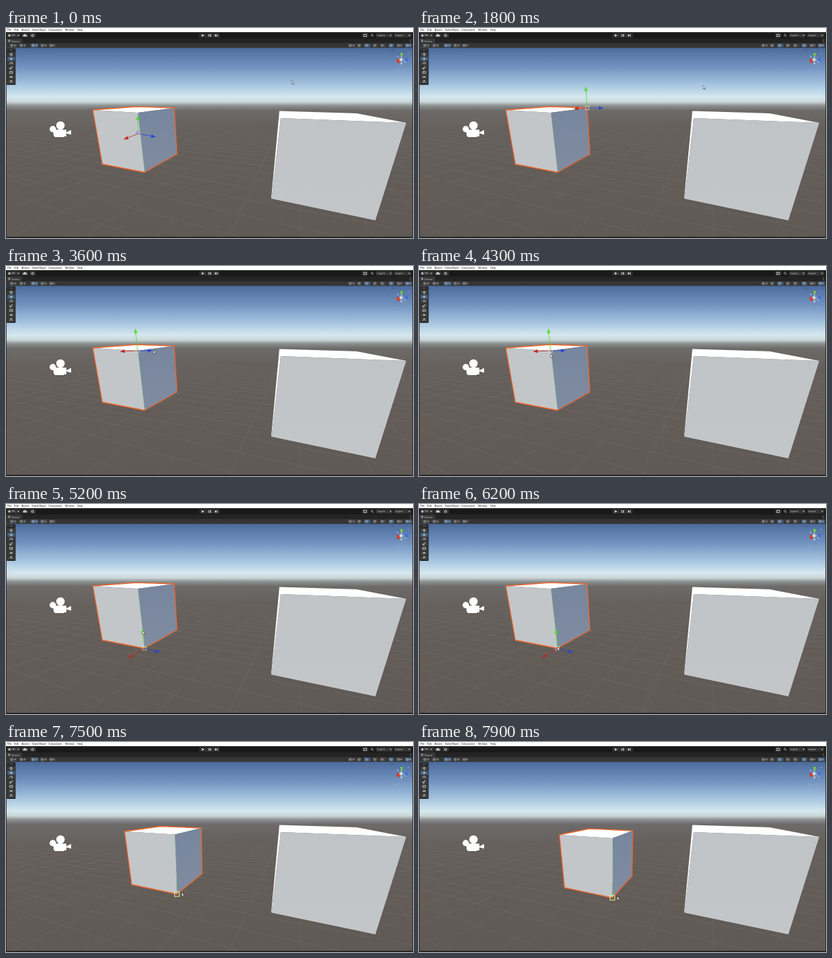
An HTML page for the animation above (8 s loop, 600 by 310 pixels).

```html
<!DOCTYPE html>
<html lang="en">
<head>
<meta charset="utf-8">
<title>Vertex snapping</title>
<style>
html, body { margin: 0; width: 100%; height: 100%; overflow: hidden; background: #191919; }
svg { display: block; width: 600px; height: 310px; }
text { font-family: "Liberation Sans", Arial, sans-serif; font-size: 3.8px; }
</style>
</head>
<body>
<svg id="stage" viewBox="0 0 600 310" xmlns="http://www.w3.org/2000/svg">
  <defs>
    <linearGradient id="sky" gradientUnits="userSpaceOnUse" x1="0" y1="29" x2="0" y2="310">
      <stop offset="0" stop-color="#4b6b9b"/>
      <stop offset=".1" stop-color="#7192bf"/>
      <stop offset=".19" stop-color="#a3c2df"/>
      <stop offset=".26" stop-color="#d5e8ef"/>
      <stop offset=".285" stop-color="#cbd6d8"/>
      <stop offset=".305" stop-color="#8b9090"/>
      <stop offset=".33" stop-color="#6d6b69"/>
      <stop offset=".42" stop-color="#655f5b"/>
      <stop offset="1" stop-color="#605954"/>
    </linearGradient>
    <linearGradient id="fade" gradientUnits="userSpaceOnUse" x1="0" y1="125" x2="0" y2="310">
      <stop offset="0" stop-color="#8b8988" stop-opacity="0"/>
      <stop offset=".3" stop-color="#8b8988" stop-opacity=".28"/>
      <stop offset="1" stop-color="#8b8988" stop-opacity=".32"/>
    </linearGradient>
    <linearGradient id="side" x1="0" y1="0" x2="0" y2="1">
      <stop offset="0" stop-color="#78869d"/>
      <stop offset="1" stop-color="#7f8ca1"/>
    </linearGradient>
    <linearGradient id="front" x1="0" y1="0" x2="0" y2="1">
      <stop offset="0" stop-color="#c0c4c7"/>
      <stop offset="1" stop-color="#c3c6c9"/>
    </linearGradient>
    <clipPath id="view"><rect y="29" width="600" height="279"/></clipPath>
  </defs>
  <rect y="29" width="600" height="281" fill="url(#sky)"/>
  <g id="grid" fill="none" stroke="url(#fade)" stroke-width=".6" clip-path="url(#view)"/>

  <g fill="#fff">
    <circle cx="69" cy="149.3" r="4.7"/>
    <circle cx="80.3" cy="144" r="6.2"/>
    <path d="M70 150h19v10h-4l1 1h-14l-2-3zM89 154l7-3.5v7l-7-2z"/>
  </g>

  <g id="bigCube">
    <path fill="#fff" d="M403 122.5L517 126L590 140L405 133L391.5 252L391 251Z"/>
    <path fill="url(#front)" d="M405 133L590 140L544.5 284L391.5 252Z"/>
  </g>

  <g id="cube">
    <path id="top" fill="#fff"/>
    <path id="left" fill="#c2c6c9"/>
    <path id="right" fill="url(#side)"/>
    <path id="edge" fill="none" stroke="#b4d5b7" stroke-width=".6"/>
    <path id="outline" fill="none" stroke="#f2652a" stroke-width="1.3" stroke-linejoin="round"/>
  </g>
  <g id="gizmo"></g>

  <g id="axes">
    <path d="M583 47V40M583 47L589 46.5M583 47L579 48" stroke="#d6dde6" stroke-width="1"/>
    <path d="M581 37h4.2l-2 6z" fill="#79d82b"/>
    <path d="M592 43.8v5.4l-6-2.4z" fill="#3c6ee0"/>
    <path d="M575.5 45.5l5 .7v5l-4 .5z" fill="#d2402b"/>
    <path d="M580.3 44.8h4v4h-4z" fill="#d9d9d9"/>
    <path d="M583 49l1.5 4.5h-3.2z" fill="#c9cdd2"/>
    <path d="M576 41l3 2M590 51l-3-1.5" stroke="#c9cdd2"/>
    <path d="M568 32.4h4M568 33.6h4" stroke="#3d5679" stroke-width=".6"/>
    <path d="M592 37.5h2M576 62.5h2M588 62.5h1" stroke="#b9c9da" stroke-width=".7"/>
  </g>

  <g id="chrome">
    <rect width="600" height="6.4" fill="#fff"/>
    <rect y="6.4" width="600" height="9" fill="#191919"/>
    <rect y="15.4" width="600" height="7" fill="#242424"/>
    <rect y="15.4" width="24" height="7" fill="#383838"/>
    <rect y="22.2" width="600" height="7.2" fill="#353535"/>
    <rect y="308.4" width="600" height="1.6" fill="#1c1c1c"/>
    <rect y="29" width=".8" height="281" fill="#222"/>
    <rect x="599.2" y="29" width=".8" height="281" fill="#222"/>
    <g id="menu" fill="#151515"></g>
    <g fill="#c8c8c8">
      <rect x="1.5" y="7.7" width="20" height="6.6" rx="1" fill="#343434"/>
      <circle cx="5" cy="11" r="1.7"/>
      <text x="8.5" y="12.4">RK</text>
      <path d="M16.5 10.3h3l-1.5 1.8z"/>
      <rect x="23" y="7.7" width="10" height="6.6" rx="1" fill="#343434"/>
      <path d="M25.5 12.6a1.3 1.3 0 0 1 .4-2.4a2 2 0 0 1 3.7 0a1.2 1.2 0 0 1 .5 2.4z"/>
      <rect x="34.5" y="7.7" width="9.5" height="6.6" rx="1" fill="#343434"/>
      <circle cx="39.2" cy="11" r="1.5" fill="none" stroke="#c8c8c8" stroke-width="1"/>
      <rect x="285" y="7.7" width="30" height="6.6" rx="1" fill="#303030"/>
      <path d="M288.7 9l3.6 2l-3.6 2zM298.7 9h1.1v4h-1.1zM301 9h1.1v4h-1.1zM308 9l2.6 2l-2.6 2zM310.8 9h.9v4h-.9z" fill="#ddd"/>
      <rect x="525" y="7.7" width="9" height="6.6" rx="1" fill="#343434"/>
      <rect x="527.5" y="9.3" width="3.8" height="3.3" fill="none" stroke="#c8c8c8" stroke-width=".8"/>
      <circle cx="539.5" cy="10.5" r="1.4" fill="none" stroke="#c8c8c8" stroke-width=".7"/>
      <path d="M540.5 11.5l1.6 1.6" stroke="#c8c8c8" stroke-width=".8"/>
      <rect x="545.5" y="7.7" width="24.5" height="6.6" rx="1" fill="#343434"/>
      <rect x="572" y="7.7" width="25.5" height="6.6" rx="1" fill="#343434"/>
      <text x="547.5" y="12.4">Layers</text>
      <text x="574" y="12.4">Layout</text>
      <path d="M565.5 10.3h3l-1.5 1.8zM593 10.3h3l-1.5 1.8z"/>
      <path d="M3 18h3.4M3 19.8h3.4M4 17v3.8M5.4 17v3.8" stroke="#c8c8c8" stroke-width=".5"/>
      <text x="8" y="20.5" style="font-size:4.2px">Scene</text>
      <path d="M596 17v.8M596 18.6v.8M596 20.2v.8" stroke="#c8c8c8" stroke-width=".8"/>
    </g>
    <g id="bar"></g>
    <g id="tools"></g>
  </g>
  <path id="cursor" d="M0 0V5.2L1.2 4.1L2.1 6L3 5.6L2.1 3.8H3.8Z" fill="#fff" stroke="#222" stroke-width=".5"/>
</svg>
<script>
const LOOP = 8000, STEP = 100;
const $ = id => document.getElementById(id);
const mix = (a, b, k) => a + (b - a) * k;
const mixPt = (p, q, k) => [mix(p[0], q[0], k), mix(p[1], q[1], k)];
const poly = pts => "M" + pts.map(p => p.join(" ")).join("L") + "Z";
const line = (p, q, color, w) =>
  `<path d="M${p}L${q}" stroke="${color}" stroke-width="${w}" fill="none"/>`;
const box = (x, y, w, h, fill, extra = "") =>
  `<rect x="${x}" y="${y}" width="${w}" height="${h}" fill="${fill}" ${extra}/>`;

// Ground lines fan out from the two vanishing points
function drawGrid() {
  let d = "";
  for (let i = -24; i <= 24; i++) d += `M420 108L${4 + i * 108} 310`;
  for (let i = 1; i <= 26; i++) d += `M-400 108L${-400 + i * 150} 310`;
  $("grid").innerHTML = `<path d="${d}"/>`;
}

function drawMenu() {
  const items = { File: 2, Edit: 12, Assets: 23, GameObject: 38, Component: 62.5, Window: 87, Help: 105 };
  $("menu").innerHTML = Object.entries(items)
    .map(([name, x]) => `<text x="${x}" y="4.4">${name}</text>`).join("");
}

function drawBar() {
  const cells = [[5, 11], [19, 11], [36.5, 11, 1], [50, 11], [63, 10], [504, 11], [517, 7],
    [528, 9, 1], [540, 8], [551, 9], [564, 8, 1], [575, 10], [588, 10, 1]];
  $("bar").innerHTML = cells.map(([x, w, on]) =>
    box(x, 23, w, 5.6, on ? "#46607c" : "#454545", 'rx=".8"') +
    `<circle cx="${x + 3.6}" cy="25.8" r="1.4" fill="none" stroke="#d0d0d0" stroke-width=".7"/>` +
    (w > 9 ? `<path d="M${x + w - 4} 25.2h2.6l-1.3 1.5z" fill="#c8c8c8"/>` : "")).join("");
}

function drawTools() {
  const icons = ["M-1.5 -1v1.5L-.5 2H1L1.6 -.8M-.5 0V-2M.6 0V-2", "M-2.2 0H2.2M0 -2.2V2.2",
    "M-1.5 1A1.8 1.8 0 1 1 1.5 1M1.5 1V-.6", "M-1.8 1.8V0H0V1.8ZM0 0L1.8 -1.8H.4",
    "M-2 -1.5H2V1.5H-2Z", "M-1.5 -1.5L1.5 1.5M1.5 -1.5L-1.5 1.5M-2 0H2", "M-2 2L0 -1.5L2 2M-1 -1.5H1"];
  $("tools").innerHTML = box(1, 30, 13.2, 54, "#2b2b2b", 'rx="1"') +
    line([5, 32.5], [10, 32.5], "#777", .7) +
    icons.map((d, i) => {
      const y = 38.8 + i * 6.7;
      return box(2, y - 3, 11.2, 6, i === 1 ? "#46607c" : "#3c3c3c") +
        `<path transform="translate(7.6 ${y})" d="${d}" fill="none" stroke="#ddd" stroke-width=".8"/>`;
    }).join("");
}

// Corner order: left, back, right, near top, right bottom, near bottom, left bottom
const REST = [[128, 121], [193, 116], [248, 118], [194, 125], [252, 186], [204, 213], [142, 201]];
const MID = [[142.5, 127], [205, 121], [261, 123], [212, 131], [264, 191], [219, 219], [156, 206]];
const END = [[207, 137], [251, 128], [315, 131], [285, 142], [314, 198], [285, 230], [214.5, 215]];
const DRAG = 6600, SNAP = 900;

function cubeAt(t) {
  if (t <= DRAG) return REST;
  const late = t > 7100;
  const [a, b] = late ? [MID, END] : [REST, MID];
  const k = late ? (t - 7100) / 800 : (t - DRAG) / 500;
  return a.map((p, i) => mixPt(p, b[i], Math.min(k, 1)));
}

const PATH = [[0, 421, 77.5], [1400, 421, 77.5], [1600, 419, 85], [1800, 419, 85], [2600, 248, 117],
  [3000, 248, 117], [4100, 194, 130], [4300, 194, 130], [5700, 204, 211], [6600, 204, 211]];

function cursorAt(t, cube) {
  if (t > DRAG) {
    const k = Math.min((t - DRAG) / 300, 1);
    return [cube[5][0] + 7 * k, cube[5][1] - 2];
  }
  const i = Math.max(1, PATH.findIndex(p => p[0] >= t));
  const a = PATH[i - 1], b = PATH[i];
  const k = (t - a[0]) / (b[0] - a[0]);
  return mixPt(a.slice(1), b.slice(1), k * k * (3 - 2 * k));
}

// Arrow offsets: red, blue, green
const CENTER = [[-18, 7], [22, 4], [-1, -23]];
const ARROWS = {
  2: [[-16, 1], [20, 0], [-2, -28]],
  3: [[-22, 1], [18, 0], [-3, -29]],
  5: [[-20, 12], [19, 5], [-2, -25]]
};
const RGB = ["#c3241d", "#2b44d8", "#55db28"];

function arrow(o, off, color) {
  const len = Math.hypot(...off), u = [off[0] / len, off[1] / len];
  const at = (f, s) => [o[0] + off[0] + u[0] * f - u[1] * s, o[1] + off[1] + u[1] * f + u[0] * s];
  return line(o, at(-3, 0), color, .8) +
    `<path d="${poly([at(-3, -2.5), at(4, 0), at(-3, 2.5)])}" fill="${color}"/>`;
}

function square(p, size, color, w) {
  return box(p[0] - size / 2, p[1] - size / 2, size, size, "none", `stroke="${color}" stroke-width="${w}"`);
}

function gizmo(t, cube, tip) {
  if (t > DRAG) {
    const p = cube[5];
    return line(p, [p[0], p[1] - 22], "#5f9a5c", .5) +
      line(p, [p[0] + 20, p[1] + 5], "#8a6048", .4) + square(p, 7, "#e8dc8c", 1.1);
  }
  const snap = t >= SNAP;
  const gap = i => Math.hypot(cube[i][0] - tip[0], cube[i][1] - tip[1]);
  const id = [2, 3, 5].reduce((a, b) => gap(b) < gap(a) ? b : a);
  const o = snap ? cube[id] : [195, 156];
  const offs = snap ? ARROWS[id] : CENTER;
  const handle = snap ? square(o, 5.5, "#d2d3c8", .7)
    : `<path d="M${o}l-3 1v-4l3 -1z" fill="#9db7ee" stroke="#456be0" stroke-width=".5"/>` +
      `<path d="M${o}l4 .6v-4l-4 -.6z" fill="none" stroke="#d97f70" stroke-width=".5"/>`;
  return offs.map((off, i) => arrow(o, off, RGB[i])).join("") + handle;
}

function render(ms) {
  const t = Math.floor(ms / STEP) * STEP;
  const cube = cubeAt(t), tip = cursorAt(t, cube);
  const face = (id, ...n) => $(id).setAttribute("d", poly(n.map(i => cube[i])));
  face("top", 0, 1, 2, 3);
  face("left", 0, 3, 5, 6);
  face("right", 3, 2, 4, 5);
  face("edge", 3, 5);
  face("outline", 0, 1, 2, 4, 5, 6);
  $("gizmo").innerHTML = gizmo(t, cube, tip);
  $("cursor").setAttribute("transform", `translate(${tip})`);
}

drawGrid();
drawMenu();
drawBar();
drawTools();
const start = performance.now();
function tick() {
  render((performance.now() - start) % LOOP);
  requestAnimationFrame(tick);
}
tick();
</script>
</body>
</html>
```
